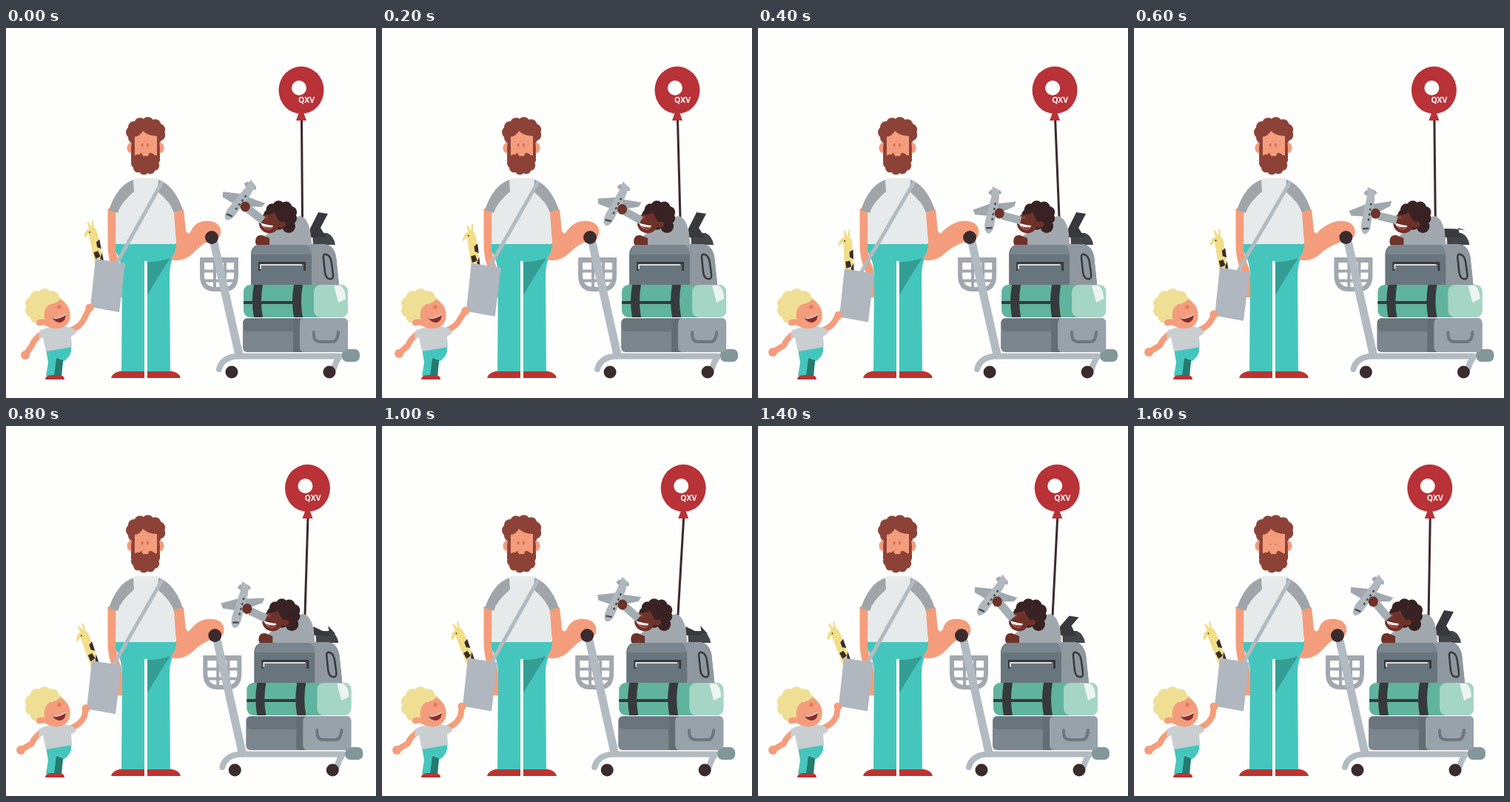
An HTML page with a canvas that plays this animation: 500 px wide and 500 px high, repeating every 1700 ms.

```html
<!DOCTYPE html>
<html lang="en">
<head>
<meta charset="utf-8">
<title>Family at the airport</title>
<style>
html, body { margin: 0; width: 100%; height: 100%; overflow: hidden; background: #fefefd; }
canvas { display: block; width: 500px; height: 500px; }
</style>
</head>
<body>
<canvas id="stage" width="500" height="500"></canvas>
<script>
const ctx = document.getElementById('stage').getContext('2d');
const LOOP = 1700, STEP = 100;
const SKIN = '#f49d7c', BROWN = '#8d4238', TEAL = '#45c6bd', RED = '#bb3431', METAL = '#b3bbc2',
  DARK = '#3a2b2d', DARK_SKIN = '#6e3229', PAPER = '#fefefd', SHIRT = '#e6eaea', SLEEVE = '#9fa5a9',
  BLACK = '#363a3c', BLOND = '#eedf95';

// Eases through [time, value] points and holds the first and last value.
function ease(time, ...points) {
  const i = points.findIndex(([at]) => at > time);
  if (i === 0) return points[0][1];
  if (i < 0) return points[points.length - 1][1];
  const [t0, from] = points[i - 1], [t1, to] = points[i];
  return from + (to - from) * (1 - Math.cos(Math.PI * (time - t0) / (t1 - t0))) / 2;
}

function poseAt(time) {
  return {
    cart: ease(time, [0, 0], [500, 9], [1200, -3]),
    bagX: ease(time, [150, 0], [500, -5]),
    bagY: ease(time, [0, 0], [450, 14], [1000, 1.5]),
    giraffe: ease(time, [0, -11], [400, -2], [900, -20]),
    wave: ease(time, [0, 0], [400, 1]),
    balloon: ease(time, [200, 399], [800, 407.5], [1200, 407], [LOOP, 399]),
    planeY: ease(time, [0, 233], [500, 247], [1300, 229]),
    planeTurn: ease(time, [0, -53], [500, -82], [1400, -54]),
    legDrop: ease(time, [400, 0], [700, 1], [1200, 1], [1500, 0])
  };
}

function fill(d, color) { ctx.fillStyle = color; ctx.fill(new Path2D(d)); }

function stroke(d, color, width, cap = 'round') {
  ctx.strokeStyle = color;
  ctx.lineWidth = width;
  ctx.lineCap = cap;
  ctx.lineJoin = 'round';
  ctx.stroke(new Path2D(d));
}

function oval(x, y, rx, color, ry = rx) {
  ctx.fillStyle = color;
  ctx.beginPath();
  ctx.ellipse(x, y, rx, ry, 0, 0, Math.PI * 2);
  ctx.fill();
}

// Curly hair: an oval with a ring of equal curls.
function curls(x, y, rx, ry, r, color, count = 10) {
  oval(x, y, rx + r / 2, color, ry + r / 2);
  for (let i = 0; i < count; i++) {
    const a = (i + .5) / count * Math.PI * 2;
    oval(x + rx * Math.cos(a), y + ry * Math.sin(a), r, color);
  }
}

function box(x, y, w, h, color, radius = 0) {
  ctx.fillStyle = color;
  ctx.beginPath();
  ctx.roundRect(x, y, w, h, radius);
  ctx.fill();
}

function at(x, y, draw, angle = 0) {
  ctx.save();
  ctx.translate(x, y);
  ctx.rotate(angle * Math.PI / 180);
  draw();
  ctx.restore();
}

function mirrored(axis, draw) {
  for (const side of [1, -1]) {
    ctx.save();
    ctx.translate(axis, 0);
    ctx.scale(side, 1);
    draw();
    ctx.restore();
  }
}

function drawMan(blink) {
  stroke('M143 244V292Q143 312 150 326Q153 335 152 364', SKIN, 11, 'butt');
  mirrored(189, () => {
    fill('M-2 473H-47Q-45 464 -29 463H-2Z', RED);
    fill('M1 291H-41V301Q-32 316 -32 335L-33 464H-2V315H1Z', TEAL);
  });
  fill('M191 316Q207 316 222 311Q210 329 191 361Z', '#349e95');
  fill('M174 203H205Q216 207 224 222L234 248L229 292H148L150 246L165 216Z', SHIRT);
  mirrored(189, () => fill('M-17 205Q-39 213 -50 246L-38 250Q-34 236 -16 221Z', SLEEVE));

  curls(189, 141, 19, 13, 8, BROWN, 11);
  box(169, 150, 39, 30, BROWN);
  mirrored(188.5, () => {
    oval(-20, 162, 5, SKIN, 7);
    oval(-17, 163, 2.5, BROWN, 10);
  });
  fill('M174 147Q181 146 185 139Q192 146 204 146V172H174Z', SKIN);
  curls(188.5, 183, 13, 9, 6.5, BROWN, 9);
  fill('M183 168H194L192 173H185Z', SKIN);
  mirrored(187.8, () => oval(-3.7, blink ? 160 : 158, 1.5, '#d9694f', blink ? .8 : 2.5));
}

function drawHoldingArm(dx) {
  fill(`M227 249L240 245L243 274Q246 281 250 274
    C${256 + dx} 262 ${266 + dx} 260 ${275 + dx} 261
    C${288 + dx} 262 ${293 + dx} 272 ${289 + dx} 282
    L${276 + dx} 288C${268 + dx} 290 262 295 252 305
    Q239 317 222 313Q231 301 230 291Z`, SKIN);
}

function drawBag(p) {
  at(128 + p.bagX, 326 + p.bagY, () => {
    fill('M-7 -50L-14 -45Q-13 -55 -5 -57L-6 -66H-4L-1 -58L1 -67H3L2 -57Q5 -54 5 -48L6 0H-6Z', '#f1de86');
    oval(-5, -52, 1, DARK);
    fill('M6 -40L1 -37V-30L6 -27ZM-5 -24L1 -25L3 -17L-4 -15ZM6 -22L2 -14L6 -9Z', DARK);
  }, p.giraffe);
  stroke(`M${150 - p.bagY * .8} ${317 + p.bagY}L211 208`, METAL, 5, 'butt');
  at(p.bagX, p.bagY, () => fill('M121 312L161 318L153 384L114 377Z', '#b0b7bf'));
}

function drawToddler(p) {
  const gripX = 113 + p.bagX, gripY = 378 + p.bagY * .75;
  const handX = 26 - 6 * p.wave, handY = 442 - 4 * p.wave;
  stroke(`M50 412Q38 420 35 429L${handX} ${handY}`, SKIN, 8);
  oval(handX, handY, 6, SKIN);
  stroke(`M86 409Q101 404 106 392L${gripX} ${gripY}`, SKIN, 8);
  oval(gripX, gripY, 5.5, SKIN);
  fill('M54 434L88 430Q90 443 77 451L75 470H54L57 452Z', TEAL);
  fill('M68 446L77 449L75 470H65Z', '#277a70');
  fill('M53 475Q53 469 62 469H73Q79 470 79 475Z', RED);
  fill('M45 409Q59 402 79 403L91 406L95 412L88 417L89 431L54 437L50 418L44 420Z', '#c9ced1');

  curls(52, 377, 18, 16, 9, BLOND);
  fill('M60 373Q67 373 73 367C88 373 91 393 81 402Q69 411 51 401Q40 405 41 397Q43 392 52 394Q50 378 60 373Z', SKIN);
  oval(72, 377, 2.8, '#e97862');
  fill('M63 392Q73 392 80 386Q82 395 74 398Q66 398 63 392Z', '#8b2b2d');
  fill('M64 392Q73 392 80 386V388Q73 393 65 393Z', '#fff');
}

function drawBalloon(x, cartX) {
  stroke(`M${x + .5} 123L${400.5 + cartX * .8} 256`, DARK, 3, 'butt');
  at(x, 84, () => {
    fill('M-3 30H3L7 41H-7Z', '#b83237');
    oval(0, 0, 30.5, '#b83237', 32);
    oval(-3, -3, 10, '#fff');
    ctx.fillStyle = '#fff';
    ctx.font = 'bold 10.5px "Open Sans", sans-serif';
    ctx.textAlign = 'center';
    ctx.fillText('QXV', 7, 17);
  });
}

function drawTrolley() {
  fill('M262 310H314V334Q314 356 295 356H282Q262 356 262 334Z', '#a1a8ae');
  fill('M268 317H308V334Q308 350 294 350H283Q268 350 268 334Z', PAPER);
  stroke('M282 314V352M296 314V352M266 328.5H310M266 341.5H310', '#a1a8ae', 4, 'butt');
  stroke('M281 290L315 442', METAL, 11);
  stroke('M288 461Q292 445 312 443.5H451Q446 450 443 460', METAL, 8);
  box(454, 434, 24, 17, '#82979a', 7);
  oval(305, 465, 8.5, DARK);
  oval(437, 465, 8.5, DARK);
  oval(278, 283, 9, DARK);
}

function drawLuggage() {
  box(320, 392, 142, 46, '#7b868e', 6);
  box(321, 393, 70, 17, '#69747b', 5);
  box(388, 393, 14, 45, '#626d74');
  box(397, 392, 65, 46, '#98a2aa', 6);
  stroke('M416 411V416Q417 424 425 424H441Q448 424 449 411', '#6c777e', 4);

  box(321, 347, 141, 44, '#60b39c', 9);
  box(416, 347, 46, 44, '#a5d5c5', 9);
  fill('M443 348H452Q459 353 459 366L449 371Z', '#edf5f1');
  box(321, 369, 70, 4, BLACK);
  for (const x of [335, 389]) at(x, 347, () => fill('M0 0H12Q8 22 12 44H0Q-4 22 0 0Z', BLACK));

  fill('M414 277H434Q443 281 445 293H415Z', '#414548');
  fill('M331 347V305Q332 293 345 292H431Q443 294 446 309L450 347Z', '#69757d');
  fill('M343 292H407Q413 298 414 306H332Q334 295 343 292Z', '#7a868e');
  fill('M405 292H431Q443 294 446 309L450 347H413V307Q413 297 405 292Z', '#8f989f');
  box(341, 316, 64, 12, BLACK);
  box(344, 319, 58, 9, '#69757d');
  stroke('M344 325V320H399', '#d9dddd', 2);
  stroke('M429 311Q428 305 433 306Q439 308 440 318L442 333Q443 340 437 339Q432 338 431 330Z', BLACK, 2.5);
}

function drawRider(legDrop) {
  at(411, 282, () => {
    const tipX = 18 + 6 * legDrop, tipY = 30 * (legDrop - 1) - 3;
    fill(`M0 -11L${tipX - 7} ${tipY}L${tipX + 6} ${tipY + 2}L${tipX - 4} -12L22 1H0Z`, '#38393c');
  });
  fill('M350 281L377 259L398 254Q412 258 413 293H350Z', '#a1a8ad');
  curls(371, 253, 15, 12, 8, '#382223', 9);
  oval(382, 268, 9, '#382223');
  fill('M348 252Q355 254 363 249Q366 257 370 262Q379 260 378 267Q375 271 368 269C364 281 345 280 342 266Q341 256 348 252Z', DARK_SKIN);
  oval(351, 256, 2.3, '#8d4137');
  fill('M344 263Q351 266 361 267Q359 274 352 272Q346 269 344 263Z', '#fff');
  fill('M346 267Q353 270 360 269Q357 274 352 272Z', '#a63a37');
  fill('M337 289Q337 279 346 280L356 284V293H338Z', DARK_SKIN);
}

function drawPlane(p) {
  const x = 317, turn = p.planeTurn * Math.PI / 180;
  const ux = Math.cos(turn), uy = Math.sin(turn);
  const handX = x - 3 * ux - 10 * uy, handY = p.planeY - 3 * uy + 10 * ux;
  stroke(`M${347 + p.cart} 260L${handX + 4} ${handY + 3}`, '#a4adb2', 11, 'butt');
  at(x, p.planeY, () => {
    fill('M-9 -3L-11 -22L-5 -26L8 -4ZM-8 3L10 28L17 29L9 3Z', '#a0a8ae');
    fill('M18 -3L21 -10L26 -8L28 5L24 8Z', '#a0a8ae');
    fill('M-33 0Q-31 -7 -18 -7L18 -5L31 -6L28 4L15 6H-17Q-30 7 -33 0Z', '#b0b7bd');
    stroke('M-26 -4L-24 4', '#464b50', 2.4, 'butt');
    ctx.setLineDash([3, 4]);
    stroke('M-14 2H12', '#464b50', 2.4, 'butt');
    ctx.setLineDash([]);
  }, p.planeTurn);
  oval(handX, handY, 6.5, DARK_SKIN, 7);
}

function render(time) {
  const p = poseAt(time);
  ctx.fillStyle = PAPER;
  ctx.fillRect(0, 0, 500, 500);
  drawBalloon(p.balloon, p.cart);
  drawMan(time >= 1600);
  drawHoldingArm(p.cart);
  drawBag(p);
  drawToddler(p);
  at(p.cart, 0, () => {
    drawTrolley();
    drawLuggage();
    drawRider(p.legDrop);
  });
  drawPlane(p);
}

function tick() {
  render(Math.floor(performance.now() % LOOP / STEP) * STEP);
  requestAnimationFrame(tick);
}
tick();
</script>
</body>
</html>
```
